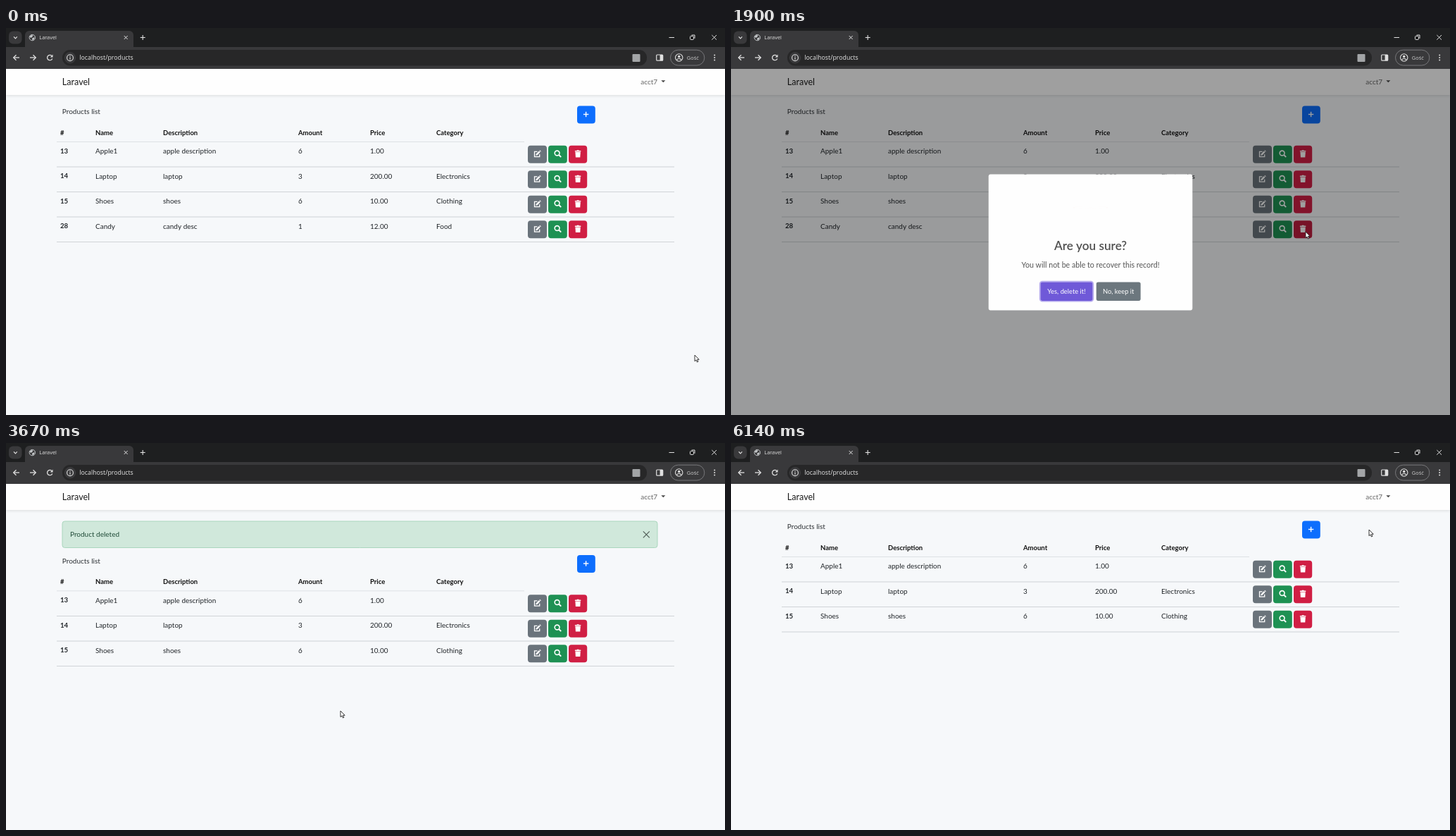
An HTML page with a canvas that plays this animation: 1021 px wide and 549 px high, repeating every 6170 ms.

```html
<!DOCTYPE html>
<html lang="en">
<head>
<meta charset="utf-8">
<title>Products</title>
<style>
html, body { margin: 0; width: 100%; height: 100%; overflow: hidden; background: #f6f8fa; }
canvas { display: block; width: 1021px; height: 549px; }
</style>
</head>
<body>
<canvas id="stage"></canvas>
<script>
const W = 1021, H = 549, LOOP = 6170;
const canvas = document.getElementById('stage');
const dpr = window.devicePixelRatio || 1;
canvas.width = Math.round(W * dpr);
canvas.height = Math.round(H * dpr);
const c = canvas.getContext('2d');

const PAGE_FONT = 'Lato, "Open Sans", sans-serif';
const UI_FONT = '"Open Sans", "Noto Sans", sans-serif';
const OPEN = 1866, CONFIRM = 3034, RELOAD = 3600, DISMISS = 5800, GONE = 5950;
const ROW_H = 35.5;
const COLS = [77, 127, 223, 415, 517, 611];
const HEAD = ['#', 'Name', 'Description', 'Amount', 'Price', 'Category'];
const ROWS = [
  ['13', 'Apple1', 'apple description', '6', '1.00', ''],
  ['14', 'Laptop', 'laptop', '3', '200.00', 'Electronics'],
  ['15', 'Shoes', 'shoes', '6', '10.00', 'Clothing'],
  ['28', 'Candy', 'candy desc', '1', '12.00', 'Food']
];
// pointer: time, x, y
const PATH = [
  [0, 978, 464], [30, 978, 464], [400, 862, 305], [630, 800, 260], [900, 784, 250],
  [1250, 786, 253], [1390, 819, 285], [1800, 819, 285], [1900, 816, 289],
  [2340, 679, 331], [2850, 475, 380], [4260, 475, 380], [4440, 488, 353],
  [4600, 509, 257], [5070, 720, 196], [5500, 906, 123], [6170, 906, 123]
];
const HAND = [[650, 1880], [2790, CONFIRM], [5450, GONE]];

const clamp = v => Math.max(0, Math.min(1, v));
const mix = (a, b, p) => a + (b - a) * p;

// CSS "ease"
function ease(x) {
  x = clamp(x);
  let lo = 0, hi = 1, s = x;
  for (let i = 0; i < 18; i++) {
    s = (lo + hi) / 2;
    const v = 0.75 * s * (1 - s) * (1 - s) + 0.75 * s * s * (1 - s) + s * s * s;
    if (v < x) lo = s; else hi = s;
  }
  return 0.3 * s * (1 - s) * (1 - s) + 3 * s * s * (1 - s) + s * s * s;
}

function steps(p, list) {
  for (let i = 1; i < list.length; i++) {
    const [a, va] = list[i - 1], [b, vb] = list[i];
    if (p <= b) return mix(va, vb, ease((p - a) / (b - a)));
  }
  return list[list.length - 1][1];
}

// monotone cubic through the pointer path
function along(t, axis) {
  let i = 0;
  while (i < PATH.length - 2 && t > PATH[i + 1][0]) i++;
  const slope = k => k < 0 || k > PATH.length - 2 ? 0 :
    (PATH[k + 1][axis] - PATH[k][axis]) / (PATH[k + 1][0] - PATH[k][0]);
  const tangent = k => {
    const a = slope(k - 1), b = slope(k);
    return a * b <= 0 ? 0 : 2 * a * b / (a + b);
  };
  const d = PATH[i + 1][0] - PATH[i][0], u = (t - PATH[i][0]) / d;
  const u2 = u * u, u3 = u2 * u;
  return (2 * u3 - 3 * u2 + 1) * PATH[i][axis] + (u3 - 2 * u2 + u) * d * tangent(i) +
    (3 * u2 - 2 * u3) * PATH[i + 1][axis] + (u3 - u2) * d * tangent(i + 1);
}

function rect(x, y, w, h, fill, r = 0) {
  c.fillStyle = fill;
  c.beginPath();
  c.roundRect(x, y, w, h, r);
  c.fill();
}
function frame(x, y, w, h, color, lw, r = 0) {
  c.strokeStyle = color;
  c.lineWidth = lw;
  c.beginPath();
  c.roundRect(x, y, w, h, r);
  c.stroke();
}
function line(color, lw, ...pts) {
  c.strokeStyle = color;
  c.lineWidth = lw;
  c.beginPath();
  for (let i = 0; i < pts.length; i += 2) c.lineTo(pts[i], pts[i + 1]);
  c.stroke();
}
function poly(fill, ...pts) {
  c.fillStyle = fill;
  c.beginPath();
  for (let i = 0; i < pts.length; i += 2) c.lineTo(pts[i], pts[i + 1]);
  c.closePath();
  c.fill();
}
function arc(x, y, r, a, b, color, lw) {
  c.strokeStyle = color;
  c.lineWidth = lw;
  c.beginPath();
  c.arc(x, y, r, a, b);
  c.stroke();
}
const ring = (x, y, r, color, lw) => arc(x, y, r, 0, Math.PI * 2, color, lw);
function dot(x, y, r, fill) {
  c.fillStyle = fill;
  c.beginPath();
  c.arc(x, y, r, 0, Math.PI * 2);
  c.fill();
}
// y is the middle of the capitals
function text(s, x, y, size, color, weight = 400, font = PAGE_FONT, align = 'left') {
  c.font = `${weight} ${size}px ${font}`;
  c.textAlign = align;
  c.fillStyle = color;
  c.fillText(s, x, y + size * 0.36);
}

function chrome() {
  const ink = '#e0e0e0';
  rect(0, 0, W, 27, '#1e1f20');
  rect(0, 27, W, 31, '#39393b');
  rect(4, 4.5, 18.5, 18, '#39393b', 6);
  line(ink, 1.2, 11, 12.4, 13.4, 14.8, 15.8, 12.4);
  rect(27, 4, 154, 24, '#39393b', [6, 6, 0, 0]);
  ring(37.3, 13.6, 4.2, '#c4c7c9', 1);
  poly('#c4c7c9', 33.5, 12, 36, 10, 38.5, 10.5, 37, 13, 35, 14);
  poly('#c4c7c9', 37, 14.5, 40.5, 13, 40, 16, 37.5, 17.5);
  text('Laravel', 47.3, 13.6, 7.4, ink, 400, UI_FONT);
  line(ink, 1, 167.7, 11, 172.7, 16);
  line(ink, 1, 172.7, 11, 167.7, 16);
  line(ink, 1.1, 190.7, 13.5, 197.7, 13.5);
  line(ink, 1.1, 194.2, 10, 194.2, 17);
  line(ink, 1, 941.5, 13.5, 949, 13.5);
  frame(971.5, 11.5, 5, 5, ink, 1, 1);
  line(ink, 1, 973.5, 10, 978, 10, 978, 14.8);
  line(ink, 1, 1002.3, 10, 1009, 16.7);
  line(ink, 1, 1009, 10, 1002.3, 16.7);

  line(ink, 1.3, 19, 42, 10.8, 42);
  line(ink, 1.3, 14.5, 38.2, 10.7, 42, 14.5, 45.8);
  line(ink, 1.3, 34, 42, 42.2, 42);
  line(ink, 1.3, 38.5, 38.2, 42.3, 42, 38.5, 45.8);
  arc(62.3, 42, 3.7, 0.4, 5.5, ink, 1.3);
  poly(ink, 66.5, 37.6, 66.5, 41.4, 62.8, 41.4);
  rect(80, 31, 830, 22.5, '#272728', 11);
  dot(91, 42.2, 8.2, '#39393b');
  ring(91, 42.2, 4.4, ink, 1.1);
  line(ink, 1.1, 91, 41.6, 91, 44.7);
  dot(91, 39.9, 0.7, ink);
  text('localhost/products', 104.3, 42.2, 8.8, '#e6e6e6', 400, UI_FONT);
  rect(889.5, 37, 11, 11, '#a3a5a7', 1);
  frame(923.7, 38, 9, 8.2, ink, 1.2, 1);
  rect(928.6, 38, 4.4, 8.2, ink);
  frame(943.5, 31.2, 48.3, 21.8, '#77777a', 1, 11);
  ring(955.7, 42, 5.2, ink, 1.1);
  dot(955.7, 40.5, 1.7, ink);
  arc(955.7, 47, 3.6, 3.7, 5.72, ink, 1.2);
  text('Gość', 966.8, 42.2, 7.4, '#d0d0d0', 400, UI_FONT);
  for (let i = -1; i < 2; i++) dot(1006.2, 42 + i * 3.5, 1, ink);
}

const ICONS = {
  edit(x, y) {
    c.strokeStyle = '#fff';
    c.lineWidth = 1.3;
    c.beginPath();
    c.moveTo(x, y - 3);
    c.lineTo(x - 4, y - 3);
    c.lineTo(x - 4, y + 4.3);
    c.lineTo(x + 3.2, y + 4.3);
    c.lineTo(x + 3.2, y + 0.8);
    c.stroke();
    line('#fff', 2.3, x - 1, y + 1.2, x + 3.2, y - 3);
    line('#fff', 2.3, x + 3.7, y - 3.5, x + 4.5, y - 4.3);
    poly('#fff', x - 2.3, y + 2.5, x - 1.7, y + 0.2, x, y + 1.9);
  },
  search(x, y) {
    ring(x - 0.8, y - 0.9, 3.4, '#fff', 1.6);
    line('#fff', 1.9, x + 1.7, y + 1.6, x + 4.8, y + 4.7);
  },
  trash(x, y) {
    rect(x - 4.3, y - 4.4, 8.6, 1.4, '#fff', 0.4);
    rect(x - 1.5, y - 5.2, 3, 1.2, '#fff', 0.4);
    poly('#fff', x - 3.7, y - 2.3, x + 3.7, y - 2.3, x + 3.2, y + 5, x - 3.2, y + 5);
  }
};

function button(x, y, w, color, icon, dark) {
  rect(x, y, w, 25, color, 4);
  if (dark > 0) rect(x, y, w, 25, `rgba(0,0,0,${0.13 * dark})`, 4);
  ICONS[icon](x + w / 2, y + 11.7);
}

function page(t, mx, my) {
  rect(0, 58, W, H - 58, '#f6f8fa');
  c.save();
  c.shadowColor = 'rgba(0,0,0,.12)';
  c.shadowBlur = 4 * dpr;
  c.shadowOffsetY = dpr;
  rect(0, 58, W, 37, '#fefefe');
  c.restore();
  text('Laravel', 79.8, 76, 12.6, '#1b1b1b');
  text('acct7', 901.3, 76.2, 10, '#666');
  poly('#4a4a4a', 930.3, 74.2, 936.3, 74.2, 933.3, 77.3);

  const reloaded = t >= RELOAD;
  const alert = reloaded && t < GONE;
  const dy = alert ? 48.5 : 0;
  if (alert) {
    c.globalAlpha = 1 - ease((t - DISMISS) / (GONE - DISMISS));
    rect(80, 111, 845, 37.5, '#d0e8db', 3.5);
    frame(80, 111, 845, 37.5, '#a9d6bd', 1, 3.5);
    text('Product deleted', 91, 129.8, 10, '#1f4a37');
    line('#53605a', 1.2, 904.8, 125.3, 913.8, 134.3);
    line('#53605a', 1.2, 913.8, 125.3, 904.8, 134.3);
    c.globalAlpha = 1;
  }

  c.save();
  c.translate(0, dy);
  text('Products list', 79.8, 118.5, 10, '#2c3034');
  rect(811, 110.5, 25.8, 25, '#0d6efd', 4);
  line('#fff', 1.4, 819.9, 122.5, 827.3, 122.5);
  line('#fff', 1.4, 823.6, 118.8, 823.6, 126.2);
  HEAD.forEach((s, i) => text(s, COLS[i], 148.3, 9.5, '#111', 700));
  rect(72, 161, 664, 0.8, '#d6dadd');

  const rows = reloaded ? ROWS.slice(0, 3) : ROWS;
  const modal = t >= OPEN && t < CONFIRM + 150;
  rows.forEach((row, k) => {
    const top = 161.5 + k * ROW_H, at = my - dy;
    const hover = !modal && mx > 72 && mx < 949 && at >= top && at < top + ROW_H;
    if (hover) rect(72, top, 877, ROW_H, 'rgba(0,0,0,.08)');
    rect(72, top + ROW_H - 0.4, 877, 0.8, '#d0d4d7');
    row.forEach((s, i) => text(s, COLS[i], top + 13, i ? 10 : 9.7, '#212529', i ? 400 : 700));
    const ramp = (a, b) => reloaded ? 0 : ease((t - a) / 150) * (1 - ease((t - b) / 150));
    button(741, top + 5.2, 27, '#6a737b', 'edit', 0);
    button(770, top + 5.2, 26.8, '#1e9153', 'search', k === 2 ? ramp(690, 1360) : 0);
    button(799, top + 5.2, 26.2, '#d01f44', 'trash', k === 3 ? ramp(1390, OPEN) : 0);
  });
  c.restore();
}

function dialog(t) {
  if (t < OPEN || t >= CONFIRM + 150) return;
  const closing = t >= CONFIRM, age = t - OPEN, out = t - CONFIRM;
  const shade = 0.4 * (closing ? 1 - ease(out / 130) : ease(age / 50));
  rect(0, 58, W, H - 58, `rgba(0,0,0,${shade})`);

  const hide = closing ? ease(out / 150) : 0;
  const scale = closing ? 1 - 0.5 * hide :
    steps(age / 300, [[0, 0.7], [0.45, 1.05], [0.8, 0.95], [1, 1]]);
  c.save();
  c.globalAlpha = 1 - hide;
  c.translate(510.5, 304);
  c.scale(scale, scale);
  rect(-170.3, -113.5, 340.6, 227, '#fefefe', 3.5);

  const turn = ease(age / 500);
  c.save();
  c.translate(0, -58);
  c.scale(1, Math.abs(Math.cos((1 - turn) * 100 * Math.PI / 180)));
  c.globalAlpha *= turn;
  ring(0, 0, 28.3, '#f6c9a6', 2.3);
  const tilt = steps(age / 500, [[0, 45], [0.25, -25], [0.5, 15], [0.75, -5], [1, 0]]);
  c.rotate(tilt * Math.PI / 180);
  c.globalAlpha *= steps(age / 500, [[0, 0], [0.25, 0.4], [0.5, 0.8], [0.75, 1]]);
  poly('#f3b27c', -1.9, -15, 1.9, -15, 1.1, 6, -1.1, 6);
  dot(0, 12, 2.1, '#f3b27c');
  c.restore();

  text('Are you sure?', 0, 6, 20.2, '#505050', 600, PAGE_FONT, 'center');
  text('You will not be able to recover this record!', 0, 38, 12.5, '#545454', 400, PAGE_FONT, 'center');
  frame(-84.5, 65.5, 89, 33, 'rgba(112,90,224,.5)', 2, 4);
  rect(-83.5, 66.5, 87, 31, '#6f59d8', 3);
  if (t > 2790) rect(-83.5, 66.5, 87, 31, 'rgba(0,0,0,.1)', 3);
  rect(9.7, 66.5, 74, 31, '#6c777e', 3);
  text('Yes, delete it!', -40, 82, 11, '#fff', 400, PAGE_FONT, 'center');
  text('No, keep it', 46.7, 82, 11, '#fff', 400, PAGE_FONT, 'center');
  c.restore();
}

function pointer(t, x, y) {
  const hand = HAND.some(([a, b]) => t >= a && t < b);
  const p = new Path2D(hand
    ? 'M-1 1Q0-.7 1 1V5L4.2 5.8Q5 6.2 4.8 8L4 12H-1.4L-4 8.2Q-3.8 6.6-2.4 7.4L-1 8.6Z'
    : 'M0 0V8.7L2 6.9L3.4 10L4.9 9.3L3.5 6.3H6.2Z');
  c.save();
  c.translate(x, y);
  c.fillStyle = '#fff';
  c.strokeStyle = '#222';
  c.lineWidth = 0.9;
  c.lineJoin = 'round';
  c.fill(p);
  c.stroke(p);
  c.restore();
}

function draw(t) {
  const x = along(t, 1), y = along(t, 2);
  c.setTransform(dpr, 0, 0, dpr, 0, 0);
  page(t, x, y);
  dialog(t);
  chrome();
  pointer(t, x, y);
}

const start = performance.now();
function tick() {
  draw((performance.now() - start) % LOOP);
  requestAnimationFrame(tick);
}
tick();
</script>
</body>
</html>
```
